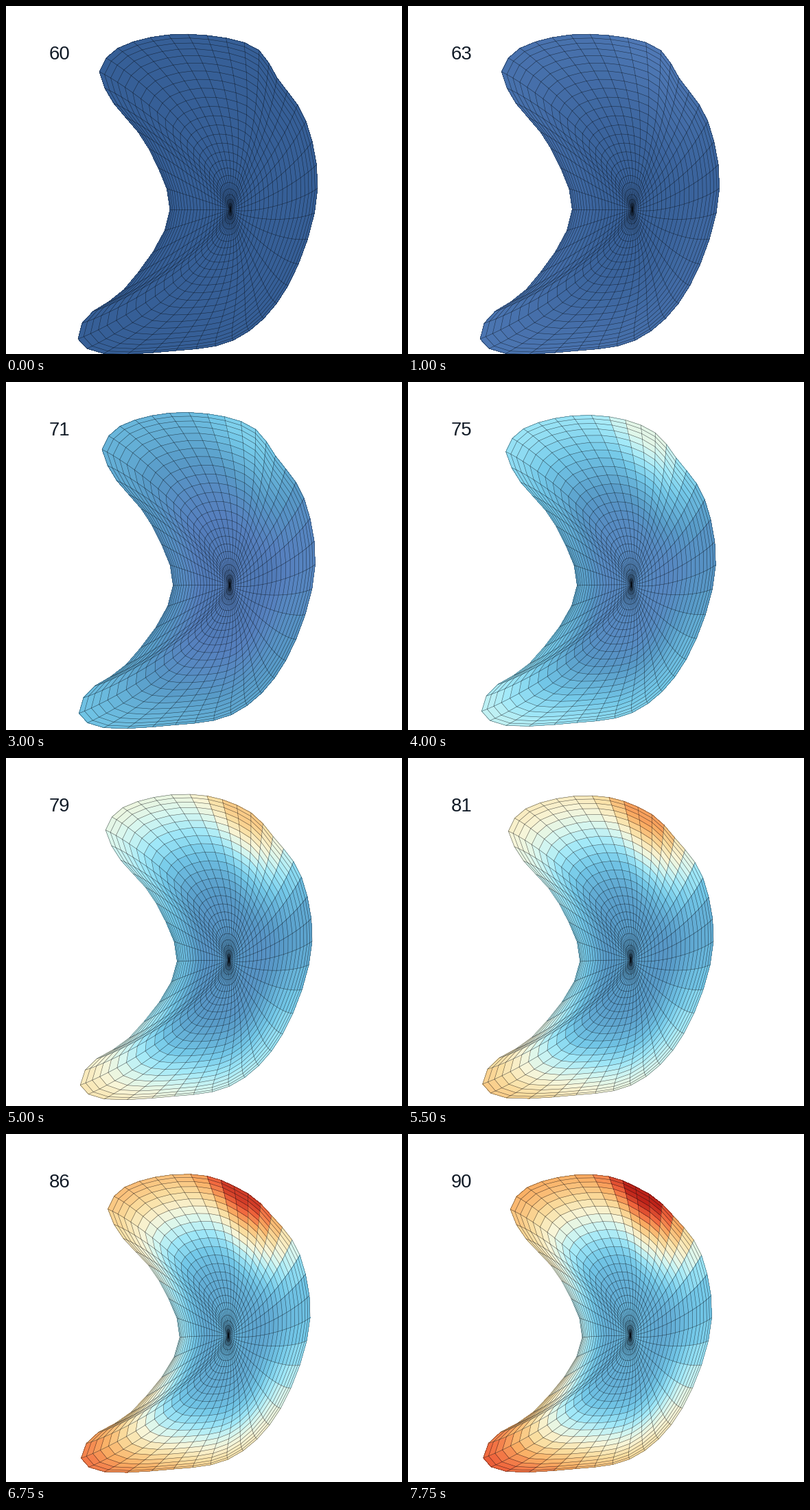
Animation, 577 px wide and 508 px high, one loop 8.5 s. Source, as a matplotlib script:

```python
import numpy as np
import matplotlib.pyplot as plt
from matplotlib.animation import FuncAnimation
from matplotlib.collections import LineCollection, PolyCollection
from matplotlib.colors import LinearSegmentedColormap

W, H, DPI = 577, 508, 64
PX = 72 / DPI
SPOKES, RINGS = 50, 25
FRAMES, INTERVAL = 34, 250
FIRST, LAST = 60, 90

# Key points of the rim, clockwise from the hollow side: spoke, x, y
RIM_KEYS = [
    (0, 239, 297), (3, 208, 208), (7, 144, 120), (8, 136, 96), (9, 146, 76),
    (12, 210, 46), (15, 293, 43), (18, 369, 65), (20, 395, 105),
    (23, 437, 168), (26, 454, 266), (30, 411, 408), (34, 331, 488),
    (37, 248, 503), (41, 118, 500), (42, 105, 486), (43, 111, 463),
    (46, 172, 414)]

# Strain along the rim: spoke, level
LOAD_KEYS = [(1, .28), (5, .5), (9, .66), (14, .7), (17.5, 1), (21, .62),
             (24.5, .1), (30, .42), (36, .62), (42, .8), (46, .58)]

CMAP = LinearSegmentedColormap.from_list("strain", [
    (0, "#365f97"), (.12, "#5680be"), (.25, "#589bc8"), (.40, "#73c8e8"),
    (.50, "#a0e8f8"), (.58, "#d7f7f0"), (.65, "#f8f5d7"), (.73, "#fadea0"),
    (.82, "#faaf64"), (.91, "#f0643c"), (1, "#be2319")], N=512)


def smooth(x):
    x = np.clip(x, 0, 1)
    return x * x * (3 - 2 * x)


def closed_curve(keys, at):
    """Periodic cubic Hermite curve through (spoke, value...) keys."""
    keys = np.array(keys, float)
    turn = np.zeros_like(keys[0])
    turn[0] = SPOKES
    keys = np.concatenate([keys[-3:] - turn, keys, keys[:3] + turn])
    s, p = keys[:, 0], keys[:, 1:]
    slope = np.gradient(p, s, axis=0)
    k = np.searchsorted(s, at, side="right") - 1
    step = (s[k + 1] - s[k])[:, None]
    u = (at - s[k])[:, None] / step
    ease = smooth(u)
    return (p[k] * (1 - ease) + p[k + 1] * ease
            + step * u * (1 - u) * (slope[k] * (1 - u) - slope[k + 1] * u))


spoke = np.arange(SPOKES)
angle = 2 * np.pi * spoke / SPOKES
t = np.linspace(0, 1, RINGS + 1)[:, None]
reach = .4 * t + 2 * t**2 - 1.4 * t**3

# The rim shrinks towards the middle while its upper shoulder flattens
RIM = closed_curve(RIM_KEYS, spoke)
shoulder = np.exp(-((spoke - 17.5) / 1.9)**2)
DRIFT = np.stack([2 + 13 * np.cos(angle) + 5 * np.sin(angle) - 16 * shoulder,
                  -.07 * (RIM[:, 1] - 297) + 7 * shoulder], axis=-1)


def strain_field():
    mid = (t[:-1] + t[1:]) / 2
    load = closed_curve(LOAD_KEYS, spoke + .5)[:, 0]
    dip = .07 * np.exp(-((mid - .5) / .18)**2)
    return np.clip(.08 - dip + load * smooth((mid - .3) / .7), 0, 1)


FIELD = strain_field()


def bend(y):
    """Sideways sag of the crescent's axis at height y from the pole."""
    return -y**2 * np.where(y < 0, .0013, .0028)


def mesh(u):
    move = np.array([smooth(u), smooth((u - .15) / .8)])
    pole = np.array([327, 297]) - 3 * move
    x, y = (RIM + DRIFT * move - pole).T
    # Tall ellipses around the pole grow into the straightened rim
    gx = ((t - 1) * 70 * np.cos(angle) + t * (x - bend(y))) * reach
    gy = ((t - 1) * 190 * np.sin(angle) + t * y) * reach
    return np.stack([gx + bend(gy), gy], axis=-1) + pole


def close(grid):
    return np.concatenate([grid, grid[:, :1]], axis=1)


def quads(grid):
    g = close(grid)
    cells = np.stack([g[:-1, :-1], g[:-1, 1:], g[1:, 1:], g[1:, :-1]], axis=2)
    return cells.reshape(-1, 4, 2)


def wires(grid):
    return list(close(grid)[1:]) + list(grid.transpose(1, 0, 2))


def cell_colors(u):
    low = .28 * smooth(u)
    high = (smooth(u) + np.sin(np.pi * u / 2)) / 2
    return CMAP((low + (high - low) * FIELD).ravel())


fig = plt.figure(figsize=(W / DPI, H / DPI), dpi=DPI, facecolor="white")
ax = fig.add_axes([0, 0, 1, 1])
ax.set_xlim(0, W)
ax.set_ylim(H, 0)
ax.axis("off")

faces = PolyCollection(quads(mesh(0)), edgecolors="none", antialiaseds=False)
lines = LineCollection(wires(mesh(0)), colors=[(.03, .05, .08, .68)],
                       linewidths=.55 * PX)
ax.add_collection(faces, autolim=False)
ax.add_collection(lines, autolim=False)
label = ax.text(63, 78, str(FIRST), fontsize=27.5 * PX,
                family="Liberation Sans", color="#101a26", va="baseline")


def draw(i):
    value = min(FIRST + max(i - 1, 0), LAST)
    u = (value - FIRST) / (LAST - FIRST)
    grid = mesh(u)
    faces.set_verts(quads(grid))
    faces.set_facecolor(cell_colors(u))
    lines.set_segments(wires(grid))
    label.set_text(str(value))
    return faces, lines, label


anim = FuncAnimation(fig, draw, frames=FRAMES, interval=INTERVAL,
                     repeat=True, repeat_delay=0)
plt.show()
```
